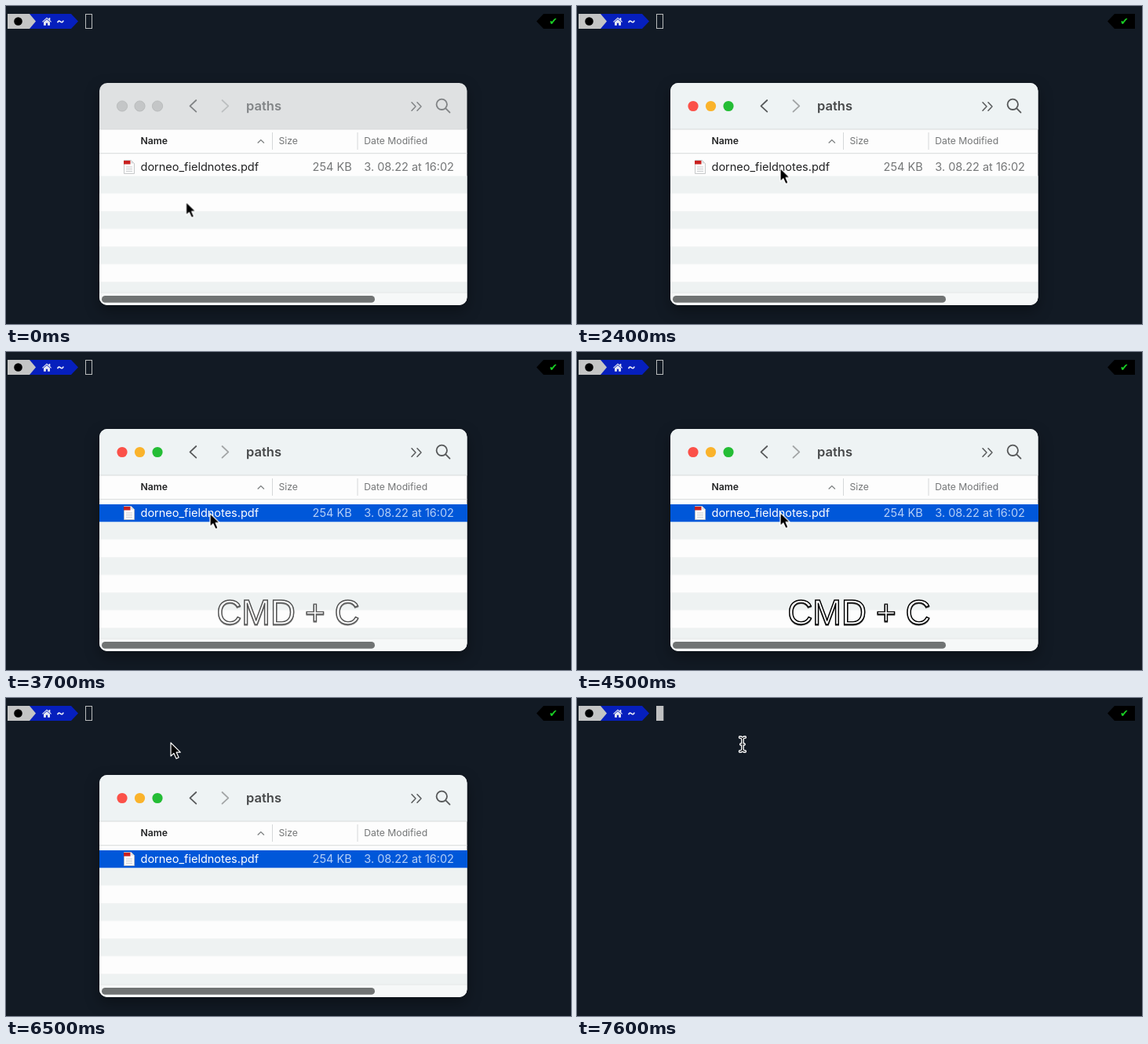
Animation, 720 px wide and 405 px high, one loop 8000 ms. Source, as an HTML page:

```html
<!DOCTYPE html>
<html lang="en">
<head>
<meta charset="utf-8">
<title>Copy a file</title>
<style>
  html, body { margin: 0; width: 100%; height: 100%; overflow: hidden; background: #121a24; }
  svg { display: block; width: 720px; height: 405px; }
  text { font-family: Inter, "Liberation Sans", sans-serif; }

  .frame { filter: drop-shadow(0 7px 9px rgba(0, 0, 0, .35)); }
  .title { font-size: 16.5px; font-weight: 600; }
  .head { font-size: 12.2px; }
  .cell { font-size: 14.5px; }
  .keys { font: 44px "Liberation Sans", Arial, sans-serif; fill: #fff; stroke: #000; stroke-width: 1.4;
          filter: drop-shadow(.8px 1px .7px rgba(0, 0, 0, .6)); }

  .blurred { color: #808385; --bar: #dfe1e2; --next: #bcbfc0; --title: #818486;
             --red: #c4c6c7; --amber: #c4c6c7; --green: #c4c6c7; --ring: #b4b6b7; }
  .focused { color: #57595a; --bar: #eef3f4; --next: #a2a5a6; --title: #464849;
             --red: #fb5149; --amber: #fab32b; --green: #24bd35; --ring: transparent; }
  .plain { --name: #202122; --info: #747677; }
  .picked { --name: #fff; --info: #b5cff7; }

  .hold { animation: 8s step-end infinite; }
  .focused { animation-name: focus; }
  .picked { animation-name: pick; }
  .before { animation-name: leave; }
  .after { animation-name: arrive; }
  .keys { animation: keys 8s linear infinite; }
  .pointer { animation: move 8s ease-in-out infinite; }

  @keyframes focus { 0% { opacity: 0 } 23.75%, 100% { opacity: 1 } }
  @keyframes pick { 0% { opacity: 0 } 40%, 100% { opacity: 1 } }
  @keyframes leave { 0% { opacity: 1 } 82.5%, 100% { opacity: 0 } }
  @keyframes arrive { 0% { opacity: 0 } 82.5%, 100% { opacity: 1 } }
  @keyframes keys {
    0%, 38.75% { opacity: 0 }
    50%, 68.75% { opacity: 1 }
    78.75%, 100% { opacity: 0 }
  }
  @keyframes move {
    0%, 1.25% { transform: translate(229.5px, 249.5px) }
    18.75%, 31.25% { transform: translate(259px, 206.5px) }
    32.5%, 50% { transform: translate(260px, 205.5px) }
    53.75%, 73.5% { transform: translate(259px, 204.5px) }
    80.5%, 100% { transform: translate(210px, 57px) }
  }
</style>
</head>
<body>
<svg viewBox="0 0 720 405">
  <defs>
    <clipPath id="round"><rect x="119" y="98" width="468.5" height="283" rx="10"/></clipPath>
    <pattern id="stripes" y="216.3" width="720" height="45" patternUnits="userSpaceOnUse">
      <rect width="720" height="45" fill="#fdfdfd"/>
      <rect width="720" height="22.5" fill="#eef2f2"/>
    </pattern>

    <g id="toolbar">
      <rect x="119" y="98" width="469" height="59" style="fill:var(--bar)"/>
      <g style="stroke:var(--ring)" stroke-width=".8">
        <circle cx="148" cy="127.5" r="6.6" style="fill:var(--red)"/>
        <circle cx="170.5" cy="127.5" r="6.6" style="fill:var(--amber)"/>
        <circle cx="193" cy="127.5" r="6.6" style="fill:var(--green)"/>
      </g>
      <g fill="none" stroke="currentColor" stroke-width="1.8" stroke-linecap="round" stroke-linejoin="round">
        <path d="M242.3 120l-7.8 7.3 7.8 7.3"/>
        <path d="M275.5 120l7.8 7.3-7.8 7.3" style="stroke:var(--next)"/>
        <path d="M517 122.8l5 5.2-5 5.2M524 122.8l5 5.2-5 5.2" stroke-width="1.5"/>
        <circle cx="555.3" cy="125.3" r="6.7"/>
        <path d="M560.3 130.3l5.2 5.3"/>
      </g>
      <text class="title" x="306" y="133" style="fill:var(--title)">paths</text>
    </g>

    <g id="row">
      <path d="M150.5 196.5h9l4 4v13h-13z" fill="#fcfcfc" stroke="#b9bcbd" stroke-width=".8"/>
      <path d="M159.5 196.5v4h4z" fill="#d8dadb"/>
      <rect x="150" y="197" width="8.5" height="4.5" fill="#c9201f"/>
      <path d="M153 205h8M153 207.7h8M153 210.4h8" stroke="#c3c6c8" stroke-width=".9"/>
      <g class="cell">
        <text x="171.5" y="210.3" style="fill:var(--name)">dorneo_fieldnotes.pdf</text>
        <g style="fill:var(--info)">
          <text x="440.7" y="210.3" text-anchor="end">254 KB</text>
          <text x="456.3" y="210.3">3. 08.22 at 16:02</text>
        </g>
      </g>
    </g>
  </defs>

  <rect width="720" height="405" fill="#121a24"/>

  <g id="prompt">
    <path d="M30 10h53l9 9.5-9 9.5H30z" fill="#061fbd"/>
    <path d="M2 10h28l8 9.5-8 9.5H2z" fill="#c4c5c5"/>
    <circle cx="15.5" cy="19.5" r="5.3" fill="#000"/>
    <path d="M46 20l6-5.6 2.6 2.4v-1.9h1.7v3.5L58 20l-.8.8-5.2-4.8-5.2 4.8zM48 20.5l4-3.6 4 3.6v4.2h-2.9v-3h-2.2v3H48z" fill="#e6e9f4"/>
    <path d="M65.7 21.2c.8-2.6 2.3-2.5 3.7-1.3s2.9 1.2 3.8-1.3" fill="none" stroke="#e9ecf6" stroke-width="1.6"/>
    <path d="M685 10h26v19h-26l-9-9.5z" fill="#000"/>
    <text x="697.5" y="24.3" text-anchor="middle" fill="#19cf24" style="font:13px 'DejaVu Sans',sans-serif">✔</text>
    <rect class="hold before" x="101.5" y="10.5" width="8" height="18" fill="none" stroke="#b9bbbc"/>
    <rect class="hold after" x="101" y="10" width="9.3" height="19" fill="#c0c1c2"/>
  </g>

  <g class="hold before">
    <g class="frame">
      <g clip-path="url(#round)">
        <rect x="119" y="98" width="469" height="283" fill="#fdfdfd"/>
        <use class="blurred" href="#toolbar"/>
        <use class="hold focused" href="#toolbar"/>
        <path d="M119 157h469M119 187.7h469" stroke="#d7dadb"/>
        <path d="M339.5 161v22M448 161v22" stroke="#d5d8d9"/>
        <g class="head" fill="#747677">
          <text x="171.5" y="175.8" fill="#222324" font-weight="600">Name</text>
          <text x="347.5" y="175.8">Size</text>
          <text x="456.3" y="175.8">Date Modified</text>
        </g>
        <path d="M320.7 174.5l4.1-4 4.1 4" fill="none" stroke="#7b7e7f" stroke-width="1.2"/>
        <rect x="119" y="216.3" width="469" height="149" fill="url(#stripes)"/>
        <use class="plain" href="#row"/>
        <g class="hold picked">
          <rect x="119" y="194" width="469" height="22.3" fill="#0057d9"/>
          <use href="#row"/>
        </g>
        <rect x="119" y="365" width="469" height="16" fill="#f6f8f8"/>
        <path d="M119 365h469" stroke="#e4e8e8"/>
        <rect x="122" y="369" width="348" height="8.8" rx="4.4" fill="#707373"/>
      </g>
    </g>
    <text class="keys" x="268.5" y="347.3">CMD + C</text>
    <g class="pointer">
      <path d="M0 0v17l3.9-3.6 3 6.7 3.2-1.4-3-6.6h5.2z" fill="#000" stroke="#fff" stroke-width="1.2" stroke-linejoin="round"/>
    </g>
  </g>

  <g class="hold after" fill="none" stroke-linecap="round">
    <path id="beam" d="M207.5 50q3.4 0 3.4 3v12q0 3-3.4 3M214.3 50q-3.4 0-3.4 3v12q0 3 3.4 3M208.8 59h4.2" stroke="#fff" stroke-width="3.4"/>
    <use href="#beam"/>
    <path d="M207.5 50q3.4 0 3.4 3v12q0 3-3.4 3M214.3 50q-3.4 0-3.4 3v12q0 3 3.4 3M208.8 59h4.2" stroke="#0b0f15" stroke-width="1.2"/>
  </g>
</svg>
</body>
</html>
```
